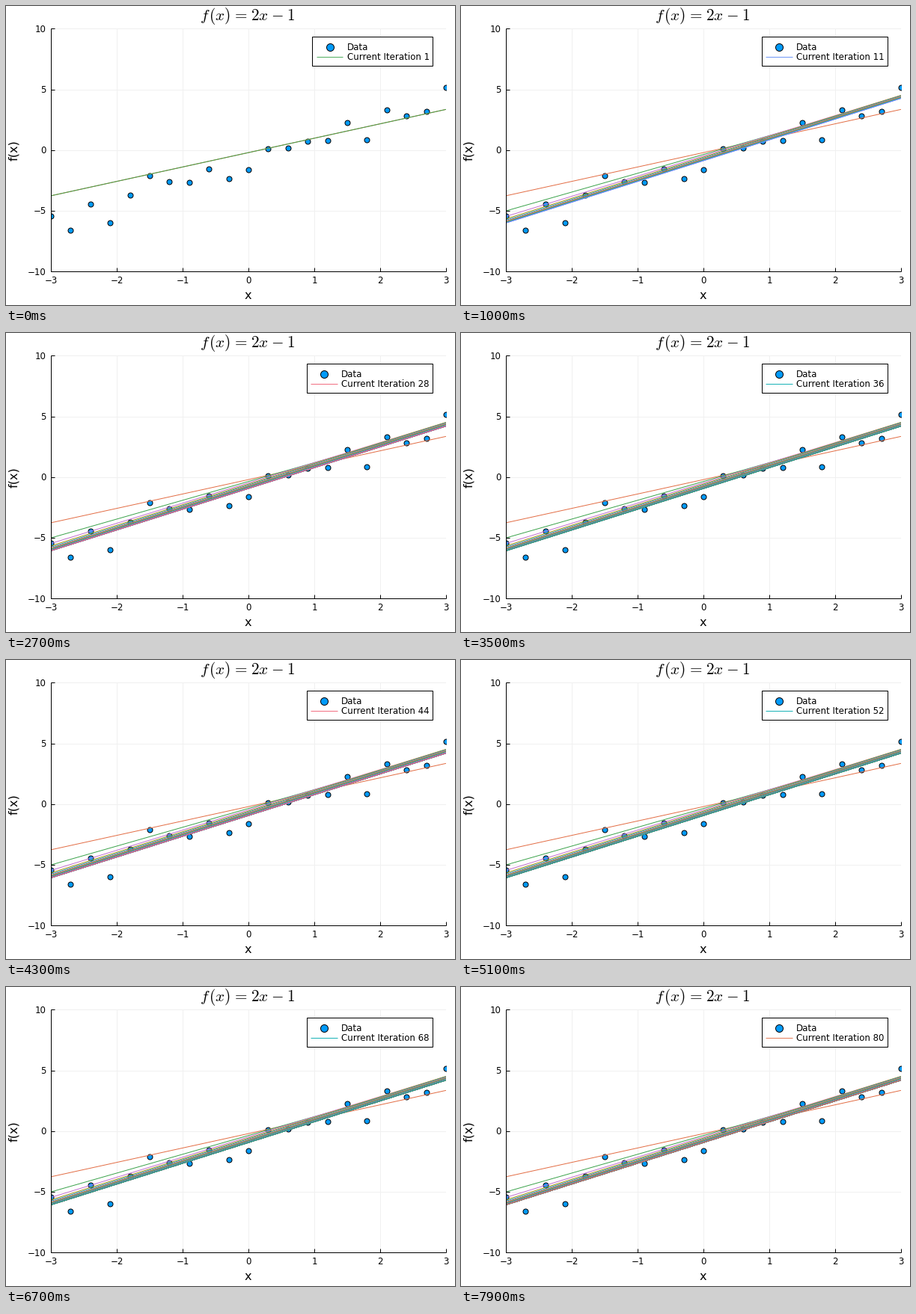
A matplotlib script for the animation above (8000 ms loop, 600 px wide and 400 px high).

```python
import matplotlib.pyplot as plt
import numpy as np
from matplotlib.animation import FuncAnimation
from matplotlib.collections import LineCollection
from matplotlib.patches import Rectangle

W, H, DPI = 600, 400, 100
FRAMES, INTERVAL = 80, 100
LEFT, RIGHT, TOP, BOTTOM = 60, 588, 30.45, 355.45
PT = 72 / DPI  # points per pixel
SMALL, MEDIUM, LARGE = 11.75 * PT, 16.15 * PT, 21.2 * PT
RATE = 0.01
GRID = "#f0f0f0"
PALETTE = ["#009AFA", "#E36F47", "#3EA44E", "#C371D2", "#AC8E18", "#00AAAE",
           "#ED5E93", "#C68225", "#00A98D", "#8E971E", "#00A9CC", "#9B7FE9",
           "#618DF6", "#F05F73", "#DD64B6", "#6C9F33"]
TITLE = (r"$f\hspace{0.1}(x)\hspace{0.1}=\hspace{0.1}2x"
         r"\hspace{0.05}-\hspace{0.05}1$")

plt.rcParams["font.family"] = "DejaVu Sans"
plt.rcParams["mathtext.fontset"] = "cm"

xs = np.linspace(-3, 3, 21)
ys = np.array([-5.42, -6.58, -4.41, -5.96, -3.71, -2.07, -2.57, -2.63, -1.57,
               -2.32, -1.63, 0.13, 0.17, 0.71, 0.78, 2.27, 0.86, 3.35, 2.80,
               3.19, 5.16])


def descend(steps):
    """Fit slope and intercept by gradient descent; one segment per step."""
    slope = bias = 0.0
    segments = []
    for _ in range(steps):
        err = slope * xs + bias - ys
        slope -= RATE * np.sum(err * xs)
        bias -= RATE * np.sum(err)
        segments.append([(x, slope * x + bias) for x in (-3, 3)])
    return segments


def color(i):
    return PALETTE[i % len(PALETTE)]


fits = descend(FRAMES)

fig = plt.figure(figsize=(W / DPI, H / DPI), dpi=DPI, facecolor="white")

ax = fig.add_axes([LEFT / W, 1 - BOTTOM / H, (RIGHT - LEFT) / W, (BOTTOM - TOP) / H])
ax.set_xlim(-3, 3)
ax.set_ylim(-10, 10)
ax.axis("off")

# Overlay in pixel coordinates, origin at the top left
page = fig.add_axes([0, 0, 1, 1])
page.set_xlim(0, W)
page.set_ylim(H, 0)
page.axis("off")


def stroke(x, y, c="black", width=1.0, z=2):
    return page.plot(x, y, color=c, lw=width * PT, zorder=z,
                     solid_capstyle="butt")[0]


def dots(axes, x, y, size, z):
    return axes.scatter(x, y, s=(size * PT) ** 2, c=PALETTE[0],
                        edgecolors="black", linewidths=PT, zorder=z)


def label(x, y, s, size=SMALL, **kw):
    kw = {"ha": "center", "va": "baseline", **kw}
    return page.text(x, y, s, fontsize=size, color="black", zorder=6, **kw)


def number(v):
    return str(v).replace("-", "\u2212")


for v in range(-3, 4):
    x = LEFT + (v + 3) / 6 * (RIGHT - LEFT)
    ax.plot([v, v], [-10, 10], color=GRID, lw=PT, zorder=0)
    stroke([x, x], [BOTTOM, BOTTOM - 5])
    label(x, 371.3, number(v))

for v in range(-10, 11, 5):
    y = BOTTOM - (v + 10) / 20 * (BOTTOM - TOP)
    ax.plot([-3, 3], [v, v], color=GRID, lw=PT, zorder=0)
    stroke([LEFT, LEFT + 5], [y, y])
    label(53.5, y + 4.3, number(v), ha="right")

stroke([LEFT, LEFT], [TOP, BOTTOM])
stroke([LEFT, RIGHT], [BOTTOM, BOTTOM])

label(323.7, 391.5, "x", MEDIUM)
label(11, 193, "f(x)", MEDIUM, rotation=90, va="center")
label(323, 18.8, TITLE, LARGE)

dots(ax, xs, ys, 7, 1)
lines = LineCollection([], linewidths=PT, zorder=2)
ax.add_collection(lines)

# Legend, right-aligned: its left part follows the caption's width
box = Rectangle((402, 41), 168, 39, fc="white", ec="black", lw=PT, zorder=4)
page.add_patch(box)
key_dot = dots(page, [0], [0], 10, 5)
key_line = stroke([], [], width=0.9, z=5)
data_text = label(0, 59.2, "Data", ha="left")
iter_text = label(0, 72.3, "", ha="left")


def draw(frame):
    n = frame + 1
    # Every fit so far, then the current one again in the next colour
    lines.set_segments(fits[:n] + [fits[frame]])
    lines.set_color([color(i) for i in range(1, n + 2)])

    shift = 0 if n > 9 else 7.47  # one digit less
    text_x = 448.1 + shift
    box.set_x(402 + shift)
    box.set_width(168 - shift)
    key_dot.set_offsets([(text_x - 22.9, 54.7)])
    key_line.set_data([text_x - 41, text_x - 5.6], [68, 68])
    key_line.set_color(color(n + 1))
    data_text.set_x(text_x)
    iter_text.set_x(text_x)
    iter_text.set_text(f"Current Iteration {n}")
    return []


anim = FuncAnimation(fig, draw, frames=FRAMES, interval=INTERVAL, repeat=True,
                     repeat_delay=0, blit=False)
plt.show()
```
